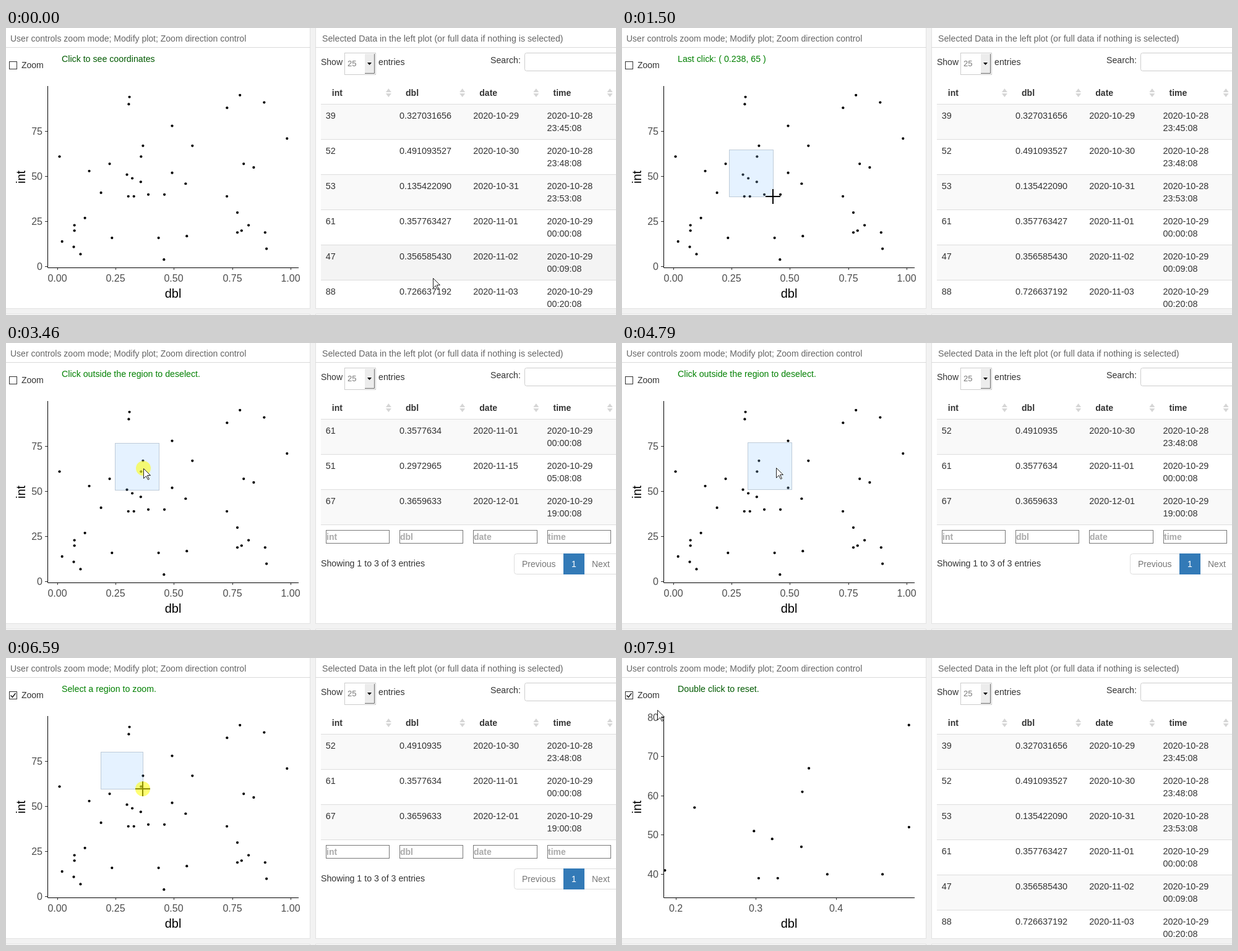
Recreate the animation shown at these times as an HTML page. Size 986 by 465 pixels, loop 8 s.

```html
<!DOCTYPE html>
<html lang="en">
<head>
<meta charset="utf-8">
<title>Brush and zoom demo</title>
<style>
html, body { margin: 0; width: 100%; height: 100%; overflow: hidden; background: #f2f2f2; }
svg { display: block; font: 14px "Liberation Sans", Arial, sans-serif; }
text { fill: #333; white-space: pre; }
.title { fill: #666; }
.cell { font-size: 14.4px; }
.bold { font-weight: bold; }
.tick { font-size: 16px; fill: #4d4d4d; }
.axis { font-size: 20px; fill: #000; }
.middle { text-anchor: middle; }
.end { text-anchor: end; }
.muted { fill: #777; }
.white { fill: #fff; }
.hint { fill: #aaa; font-weight: bold; }
.msg { font-size: 14.2px; }
</style>
</head>
<body>
<svg id="stage" width="986" height="465" viewBox="0 0 986 465"></svg>
<script>
const LOOP = 8000;
const TICK = 78.39;
const stage = document.getElementById('stage');

function add(parent, tag, attrs = {}, text) {
  const el = document.createElementNS('http://www.w3.org/2000/svg', tag);
  for (const key in attrs) el.setAttribute(key, attrs[key]);
  if (text !== undefined) el.textContent = text;
  parent.append(el);
  return el;
}
const group = parent => add(parent, 'g');
const label = (p, x, y, text, cls = '', more = {}) => add(p, 'text', { x, y, class: cls, ...more }, text);
const fillBox = (p, x, y, width, height, fill) => add(p, 'rect', { x, y, width, height, fill });
const inset = (x, y, w, h) => ({ x: x + .5, y: y + .5, width: Math.max(0, w - 1), height: Math.max(0, h - 1) });
const frame = (p, x, y, w, h, stroke, rx = 0) =>
  add(p, 'rect', { ...inset(x, y, w, h), rx, fill: '#fff', stroke });
const path = (p, d, fill = 'none', stroke = 'none', width = 1) =>
  add(p, 'path', { d, fill, stroke, 'stroke-width': width });
const show = (el, on) => { el.style.display = on ? '' : 'none'; };

// Data set in row order: dbl, int. Dates and times follow from the row number.
const data = [
  [.327031656, 39], [.491093527, 52], [.13542209, 53], [.357763427, 61], [.35658543, 47], [.726637192, 88],
  [.008, 61], [.019, 14], [.069, 11], [.072, 23], [.072, 20], [.098, 7], [.117, 27],
  [.3031926, 39], [.186, 41], [.223, 57], [.233, 16], [.2972965, 51], [.305, 90], [.308, 94],
  [.320081, 49], [.433, 16], [.456, 4], [.491, 78], [.549, 46], [.554, 17], [.578, 67],
  [.726, 39], [.771, 30], [.771, 19], [.789, 20], [.782, 95], [.798, 57], [.3659633, 67],
  [.389, 40], [.458, 40], [.819, 23], [.841, 55], [.886, 91], [.89, 19], [.896, 10], [.984, 71]
].map(([dbl, int], n) => {
  const date = new Date(Date.UTC(2020, 9, 29 + n)).toISOString().slice(0, 10);
  const time = new Date(Date.UTC(2020, 9, 28, 23, 44 + (n + 1) ** 2, 8)).toISOString();
  return { dbl, int, date, day: time.slice(0, 10), clock: time.slice(11, 19) };
});

// Panels
for (const [x, w] of [[-2, 494], [500, 490]]) {
  frame(stage, x, -2, w, 457, '#e2e2e2');
  fillBox(stage, x, 31, w, 1, '#d9d9d9');
  frame(stage, x, 463, w, 10, '#e2e2e2');
}
label(stage, 7, 22, 'User controls zoom mode; Modify plot; Zoom direction control', 'title');
label(stage, 511, 22, 'Selected Data in the left plot (or full data if nothing is selected)', 'title msg');

// Left panel
const box = frame(stage, 5, 54, 13, 13, '#333');
const check = path(stage, 'M7.5 60.5L10.5 63.5L15.5 57', 'none', '#222', 1.5);
label(stage, 25, 65, 'Zoom');
const message = label(stage, 90, 55, '', 'msg');

const inPanel = (x, y) => x > 67 && x < 473 && y > 94 && y < 388;
const range = (from, step, count) => Array.from({ length: count }, (_, i) => from + step * i);

function makePlot(px, py, xTicks, yTicks, digits) {
  const g = group(stage);
  for (const { dbl, int } of data) {
    const cx = px(dbl), cy = py(int);
    if (inPanel(cx, cy)) add(g, 'circle', { cx, cy, r: 2.1 });
  }
  path(g, 'M67.5 94V388.5H473', 'none', '#000');
  for (const v of xTicks) {
    const x = Math.floor(px(v));
    fillBox(g, x, 389, 1, 3, '#333');
    label(g, x, 411, v.toFixed(digits), 'tick middle');
  }
  for (const v of yTicks) {
    const y = Math.floor(py(v));
    fillBox(g, 63, y, 4, 1, '#333');
    label(g, 59, y + 6, v, 'tick end');
  }
  label(g, 270, 437, 'dbl', 'axis middle');
  label(g, 0, 0, 'int', 'axis middle', { transform: 'translate(31 241.5) rotate(-90)' });
  return g;
}
const fullX = v => 83.5 + 376.8 * v;
const fullY = v => 386.9 - 2.927 * v;
const fullPlot = makePlot(fullX, fullY, range(0, .25, 5), range(0, 25, 4), 2);
const zoomPlot = makePlot(v => 87.5 + 1293 * (v - .2), v => 96 + 6.36 * (80 - v),
  range(.2, .1, 3), range(40, 10, 5), 1);

// Right panel
const columns = ['int', 'dbl', 'date', 'time'].map((name, i) => ({ name, x: 516.8 + 119.25 * i }));

label(stage, 509, 60, 'Show');
frame(stage, 547, 40, 51, 36, '#ccc');
label(stage, 552, 62, '25', 'muted', { 'font-size': 13 });
fillBox(stage, 580, 42, 16, 32, '#ececec');
path(stage, 'M580 73.5H595.5V42', 'none', '#666');
path(stage, 'M584 56H591L587.5 60Z', '#000');
label(stage, 602, 60, 'entries', 'msg');
label(stage, 783, 57, 'Search:', 'msg');
frame(stage, 838, 40, 160, 30, '#ccc', 3);
for (const { name, x } of columns) {
  const mid = x + 101.6;
  label(stage, x + 10, 110, name, 'bold');
  path(stage, `M${mid - 4.5} 104h9l-4.5 -6ZM${mid - 4.5} 106h9l-4.5 6Z`, '#d6d6d6');
}
fillBox(stage, 509, 123, 477, 1, '#ddd');

function makeTable(area) {
  const g = group(stage);
  const rows = data.filter(d => inArea(area, fullX(d.dbl), fullY(d.int))).slice(0, 6);
  const bands = rows.map((row, i) => {
    const top = 124 + 57 * i;
    const band = fillBox(g, 509, top, 477, i === 5 ? 45 : 56);
    if (i) fillBox(g, 509, top - 1, 477, 1, '#ddd');
    [row.int, row.dbl.toFixed(area ? 7 : 9), row.date, row.day]
      .forEach((text, c) => label(g, columns[c].x, top + 23, text, 'cell'));
    label(g, columns[3].x, top + 43, row.clock, 'cell');
    return band;
  });
  if (rows.length < 6) makeFooter(g, rows.length);
  return { g, bands };
}

function makeFooter(g, count) {
  fillBox(g, 509, 294, 477, 1, '#ddd');
  for (const { name, x } of columns) {
    const left = Math.round(x);
    frame(g, left, 303, Math.round(x + 103.2) - left, 22, '#777');
    label(g, left + 1, 319, name, 'hint');
  }
  label(g, 509, 362, `Showing 1 to ${count} of ${count} entries`, 'msg');
  frame(g, 821, 341, 180, 34, '#ddd', 4);
  label(g, 834, 363, 'Previous', 'muted');
  fillBox(g, 901, 341, 34, 34, '#337ab7');
  label(g, 914, 363, '1', 'white');
  label(g, 947, 363, 'Next', 'muted');
}

// Pointer moves: start, end, x, y
const moves = [
  [40, 400, 173, 197], [720, 1180, 244, 273], [1500, 1960, 219, 238], [2150, 2580, 222, 203],
  [3720, 3850, 245, 202], [3940, 4080, 249, 202], [4790, 5420, 17, 59], [5750, 5950, 139, 151],
  [6110, 6260, 153, 152], [6260, 6576, 221, 212], [6576, 7050, 271, 288], [7290, 7909, 57, 84]
];
const ease = p => p * p * (3 - 2 * p);

function pointerAt(time) {
  const t = 70 + Math.floor((time - 70) / TICK) * TICK;
  let x = 690, y = 405;
  for (const [from, to, toX, toY] of moves) {
    if (t < from) break;
    const p = ease(Math.min(1, (t - from) / (to - from)));
    x += (toX - x) * p;
    y += (toY - y) * p;
  }
  return [Math.round(x), Math.round(y)];
}

// Selection: drawn from a corner, then carried by the pointer
function areaAt(t) {
  const [x, y] = pointerAt(t);
  const from = (left, top) => [left, top, x - left + 1, y - top + 1];
  const size = [72, 77];
  if (t < 720 || t >= 7220) return null;
  if (t < 1430) return from(173, 197);
  if (t < 2150) return [173, 197, ...size];
  if (t < 4790) return [x - 46, y - 41, ...size];
  if (t < 6260) return [203, 161, ...size];
  return from(153, 152);
}

function inArea(area, x, y) {
  if (!area) return true;
  const [left, top, w, h] = area;
  return x > left && x < left + w && y > top && y < top + h;
}

// Each cue changes part of the state
const cues = [
  [0, { text: 'Click to see coordinates', color: '#005a00', table: 0 }],
  [720, { press: true, drawing: true }],
  [800, { text: 'Last click: ( 0.238, 65 )', color: '#008000' }],
  [1430, { press: false }],
  [1580, { text: 'Click outside the region to deselect.', drawing: false }],
  [1650, { table: 1650 }],
  [2150, { press: true }],
  [2920, { press: false }],
  [3000, { table: 3000 }],
  [3460, { press: true }],
  [4230, { press: false }],
  [4390, { table: 4390 }],
  [5500, { press: true }],
  [5580, { press: false, checked: true }],
  [5660, { text: 'Select a region to zoom.' }],
  [6180, { drawing: true }],
  [6260, { press: true }],
  [7220, { press: false }],
  [7290, { zoomed: true, text: 'Double click to reset.', color: '#005a00' }],
  [7450, { table: 0 }]
];
const stateAt = t => Object.assign({}, ...cues.filter(c => c[0] <= t).map(c => c[1]));

// A table's key is the time whose selection it lists
const tables = new Map();
for (const [, { table }] of cues) {
  if (table !== undefined && !tables.has(table)) tables.set(table, makeTable(areaAt(table)));
}

const brush = add(stage, 'rect', { fill: '#9cf', stroke: '#036', opacity: .25 });
const pointer = group(stage);
const cross = path(pointer, 'M-12 0H12M0 -12V12', 'none', '#000', 2);
const halo = add(pointer, 'circle', { r: 12, fill: '#ff0', opacity: .55 });
const arrow = path(pointer, 'M.5 .5V16.5L4.5 12.5L7.5 18.5L9.5 17.5L6.5 11.5H11.5Z', '#fff', '#222');

function render(t) {
  const state = stateAt(t);
  const [x, y] = pointerAt(t);
  const area = areaAt(t);
  const aiming = inPanel(x, y) && (state.drawing || !area || !inArea(area, x, y));

  pointer.setAttribute('transform', `translate(${x} ${y})`);
  show(cross, aiming);
  show(arrow, !aiming);
  show(halo, state.press);

  show(brush, area && area[2] > 1);
  if (area) for (const [key, v] of Object.entries(inset(...area))) brush.setAttribute(key, v);

  message.textContent = state.text;
  message.style.fill = state.color;
  show(check, state.checked);
  box.setAttribute('stroke', x < 19 && y < 68 ? '#0078d7' : '#333');
  show(fullPlot, !state.zoomed);
  show(zoomPlot, state.zoomed);

  const hovered = x > 509 ? Math.floor((y - 123) / 57) : -1;
  for (const [key, { g, bands }] of tables) {
    show(g, key === state.table);
    bands.forEach((band, r) => band.setAttribute('fill',
      r === hovered ? '#f4f4f4' : r % 2 ? '#fff' : '#f9f9f9'));
  }
}

const start = performance.now();
function tick() {
  render((performance.now() - start) % LOOP);
  requestAnimationFrame(tick);
}
tick();
</script>
</body>
</html>
```
